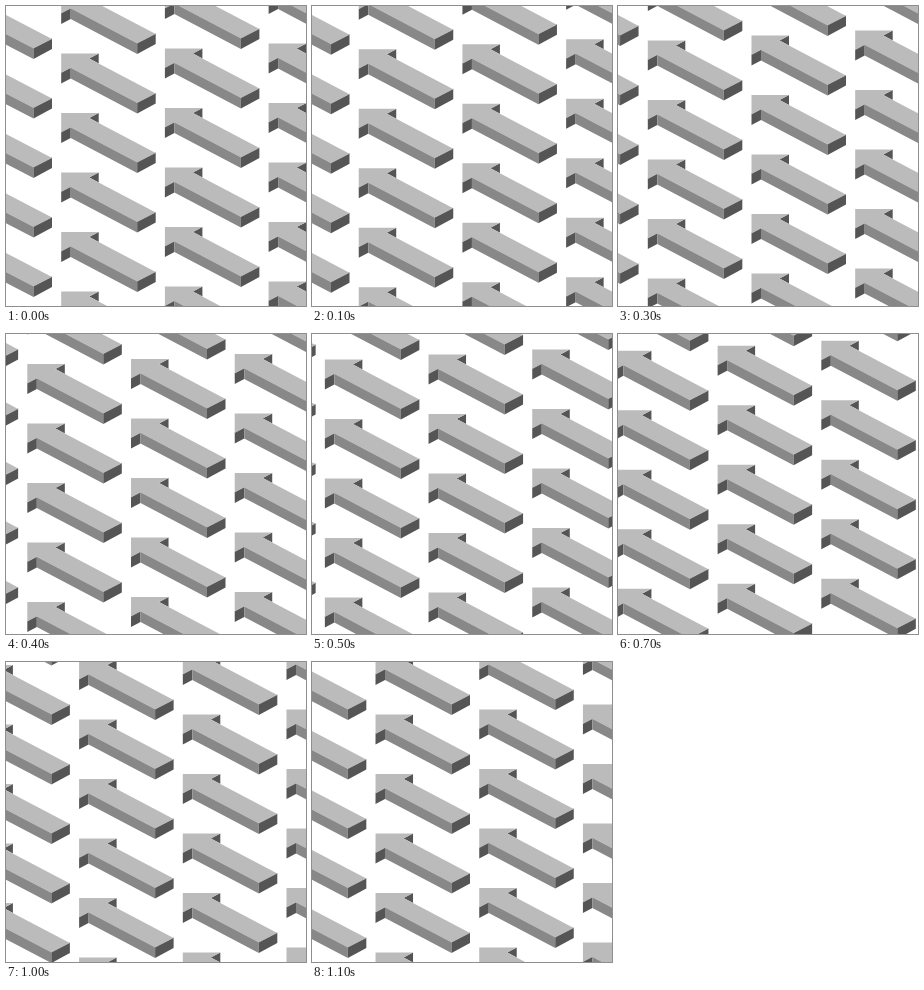
Write an HTML page with a canvas that moves like this. It is 300x300 px and loops after 1.2 s.

```html
<!DOCTYPE html>
<html>
<head>
<meta charset="utf-8">
<style>
html, body { margin: 0; width: 100%; height: 100%; overflow: hidden; background: #fff; }
canvas { display: block; }
</style>
</head>
<body>
<canvas id="stage" width="300" height="300"></canvas>
<script>
const ctx = document.getElementById('stage').getContext('2d');
const COL = 103.7, ROW = 59.5, RISE = 5;

// Faces of one arrow, relative to its tip; the top is painted last to hide seams.
const faces = [
  ['#555', 'M28 5 37.5 0V10L30 6Z'],
  ['#555', 'M0 19 9.5 14V25L0 30Z'],
  ['#888', 'M9.5 14 76 49V60L9.5 25Z'],
  ['#555', 'M76 49 94.5 39.5V50L76 60Z'],
  ['#bbb', 'M0 0H37.5L28 5 94.5 40 76 49.5 9.5 14.5 0 19.5Z']
].map(([color, d]) => [color, new Path2D(d)]);

function arrow(x, y) {
  ctx.setTransform(1, 0, 0, 1, x, y);
  for (const [color, path] of faces) {
    ctx.fillStyle = color;
    ctx.fill(path);
  }
}

function draw() {
  const step = Math.floor(performance.now() % 1200 / 100);
  // The drift quickens slightly over the last steps.
  const travel = step + Math.max(0, step - 9) * 0.13;
  const x0 = 55.2 - travel * 8.47;
  const y0 = 47.6 - travel * 4.4;

  ctx.setTransform(1, 0, 0, 1, 0, 0);
  ctx.fillStyle = '#fff';
  ctx.fillRect(0, 0, 300, 300);
  for (let col = -1; col < 4; col++) {
    for (let row = -3; row < 7; row++) {
      arrow(x0 + col * COL, y0 + row * ROW - col * RISE);
    }
  }
  requestAnimationFrame(draw);
}
draw();
</script>
</body>
</html>
```
